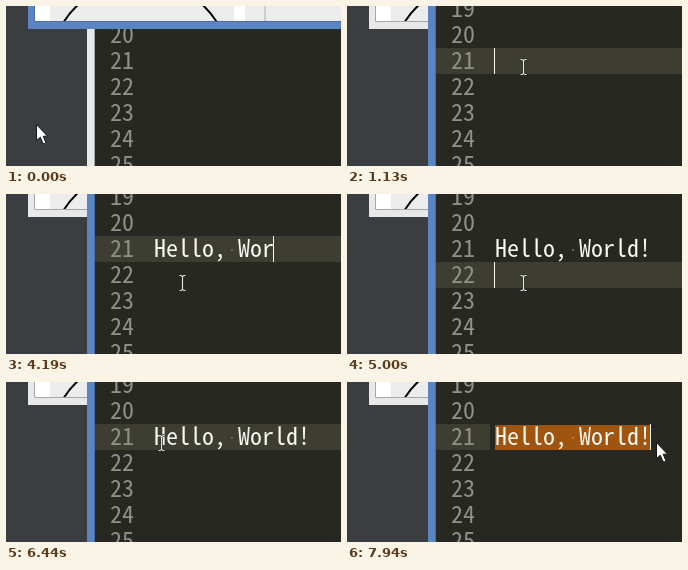
An HTML page that plays this animation: 335 by 160 pixels, repeating every 8 s.

```html
<!DOCTYPE html>
<html lang="en">
<head>
<meta charset="utf-8">
<title>Typing and selecting</title>
<style>
  html, body { margin: 0; width: 100%; height: 100%; overflow: hidden; background: #3b3e41; }
  svg { display: block; width: 100vw; height: 100vh; }
  text { font: 24px "Noto Sans Mono CJK JP", "Noto Sans Mono CJK SC", monospace; white-space: pre; }
  #numbers { fill: #8f908a; }
  #typed { fill: #f8f8f2; }
</style>
</head>
<body>
<svg viewBox="0 0 335 160">
  <rect width="335" height="160" fill="#3b3e41"/>
  <g id="layers">
    <g id="drawing">
      <rect class="frame" x="22" y="-8" width="330" height="31"/>
      <rect x="29" y="-8" width="320" height="23" fill="#fff"/>
      <rect x="44" y="-8" width="184" height="23" fill="#ececec"/>
      <rect x="239" y="-8" width="110" height="23" fill="#ececec"/>
      <path d="M259 0V15" stroke="#c4c4c4" stroke-width="1.5"/>
      <path d="M58 15.5A91 91 0 0 1 210.5 15.5" fill="none" stroke="#000" stroke-width="2"/>
      <path class="edge" d="M28.5 -8V15.5H350" fill="none"/>
    </g>
    <g id="editor">
      <rect class="frame" x="81" y="-8" width="270" height="180"/>
      <path class="edge" d="M88.5 -8V170"/>
      <rect x="89" y="-8" width="260" height="180" fill="#272822"/>
      <rect id="gutterRow" x="89" width="54" height="26" fill="#3e3d32"/>
      <rect id="textRow" x="143" width="192" height="26" fill="#3e3d32"/>
      <rect id="selection" x="148" y="43" height="25" fill="#9f5410"/>
      <g id="numbers"></g>
      <text id="typed" x="148" y="63"></text>
      <circle id="space" cx="226" cy="56" r="1" fill="#77766c"/>
      <rect id="caret" width="1" height="26" fill="#f8f8f0"/>
    </g>
  </g>
  <path id="arrow" d="M.5 .5V16.6L4.3 13.2L7 19.6Q8.6 20.4 9.8 18.5L7.2 12.2H11.5Z" fill="#fff" stroke="#17181a" stroke-linejoin="round"/>
  <g id="beam" fill="none">
    <path d="M-3 -7.5H-1.5L0 -6.5L1.5 -7.5H3M0 -6.5V6.5M-3 7.5H-1.5L0 6.5L1.5 7.5H3" stroke="#2c2c2a" stroke-width="2.4"/>
    <path d="M-3 -7.5H-1.5L0 -6.5L1.5 -7.5H3M0 -6.5V6.5M-3 7.5H-1.5L0 6.5L1.5 7.5H3" stroke="#e4e4e0" stroke-width="1.1"/>
  </g>
</svg>
<script>
const LOOP = 8000, STEP = 30, PHASE = 20;
const CELL = 12, ROW = 26;
const MESSAGE = "Hello, World!";
const KEY_TIMES = [2210, 2480, 2660, 2840, 3020, 3200, 3380, 3740, 4010, 4190, 4370, 4550, 4820];
const FOCUS = 1130, ENTER = 5000, CLICK = 5930, ARROW_BACK = 7910;
const CARET_OFF = [[1610, 2120], [5510, CLICK], [6430, 6470]];

// Pointer path: time, x, y, and whether the stretch leading here is eased.
const POINTER = [
  [0, 30, 118], [470, 30, 118], [950, 176, 61, true],
  [1430, 176, 61], [1550, 176, 89],
  [5330, 176, 89], [5750, 150, 61, true],
  [6230, 150, 61], [6440, 155, 61], [6600, 182, 61], [6800, 230, 61],
  [6980, 266, 61], [7040, 272, 61], [7300, 288, 61], [7600, 302, 61],
  [7820, 309, 61], [LOOP, 309, 61]
];

const $ = id => document.getElementById(id);
const set = (id, name, value) => $(id).setAttribute(name, value);
const show = (id, on) => set(id, "visibility", on ? "visible" : "hidden");
const rowTop = line => 42 + (line - 21) * ROW;

for (let line = 19; line <= 25; line++) {
  const label = document.createElementNS("http://www.w3.org/2000/svg", "text");
  label.setAttribute("x", 104);
  label.setAttribute("y", rowTop(line) + 21);
  label.textContent = line;
  $("numbers").append(label);
}

function pointerAt(t) {
  const i = POINTER.findIndex(p => p[0] > t);
  const [t0, x0, y0] = POINTER[i - 1], [t1, x1, y1, eased] = POINTER[i];
  let k = (t - t0) / (t1 - t0);
  if (eased) k = k * k * (3 - 2 * k);
  return [Math.round(x0 + (x1 - x0) * k), Math.round(y0 + (y1 - y0) * k)];
}

function paintFrame(id, focused) {
  const frame = document.querySelector(`#${id} .frame`);
  const edge = document.querySelector(`#${id} .edge`);
  frame.setAttribute("fill", focused ? "#5b85c2" : "#e8e8e8");
  edge.setAttribute("stroke", focused ? "#4a6da3" : "#a4a7aa");
}

let frontWindow;
function raise(id) {
  if (id === frontWindow) return;
  frontWindow = id;
  $("layers").append($(id));
  paintFrame("editor", id === "editor");
  paintFrame("drawing", id === "drawing");
}

function render(time) {
  const t = Math.max(0, Math.floor((time - PHASE) / STEP) * STEP + PHASE);
  const focused = t >= FOCUS;
  const [x, y] = pointerAt(t);
  const typed = KEY_TIMES.filter(key => key <= t).length;
  const selected = t < 6260 ? 0
    : Math.min(MESSAGE.length, Math.max(0, Math.round((x - 149.5) / CELL)));
  const line = t >= ENTER && t < CLICK ? 22 : 21;
  const column = t < ENTER ? typed : selected;

  raise(focused ? "editor" : "drawing");
  $("typed").textContent = MESSAGE.slice(0, typed);
  show("space", typed > 6);
  set("space", "fill", selected > 6 ? "#c08a58" : "#77766c");

  set("gutterRow", "y", rowTop(line));
  set("textRow", "y", rowTop(line));
  show("gutterRow", focused);
  show("textRow", focused && !selected);
  set("selection", "width", selected * CELL);

  set("caret", "x", 147 + column * CELL);
  set("caret", "y", rowTop(line));
  show("caret", focused && !CARET_OFF.some(([from, to]) => t >= from && t < to));

  const overText = x >= 143 && t < ARROW_BACK;
  show("arrow", !overText);
  show("beam", overText);
  set("arrow", "transform", `translate(${x} ${t < ARROW_BACK ? y : y - 1})`);
  set("beam", "transform", `translate(${x + 0.5} ${y})`);
}

const start = performance.now();
function tick() {
  render((performance.now() - start) % LOOP);
  requestAnimationFrame(tick);
}
tick();
</script>
</body>
</html>
```
